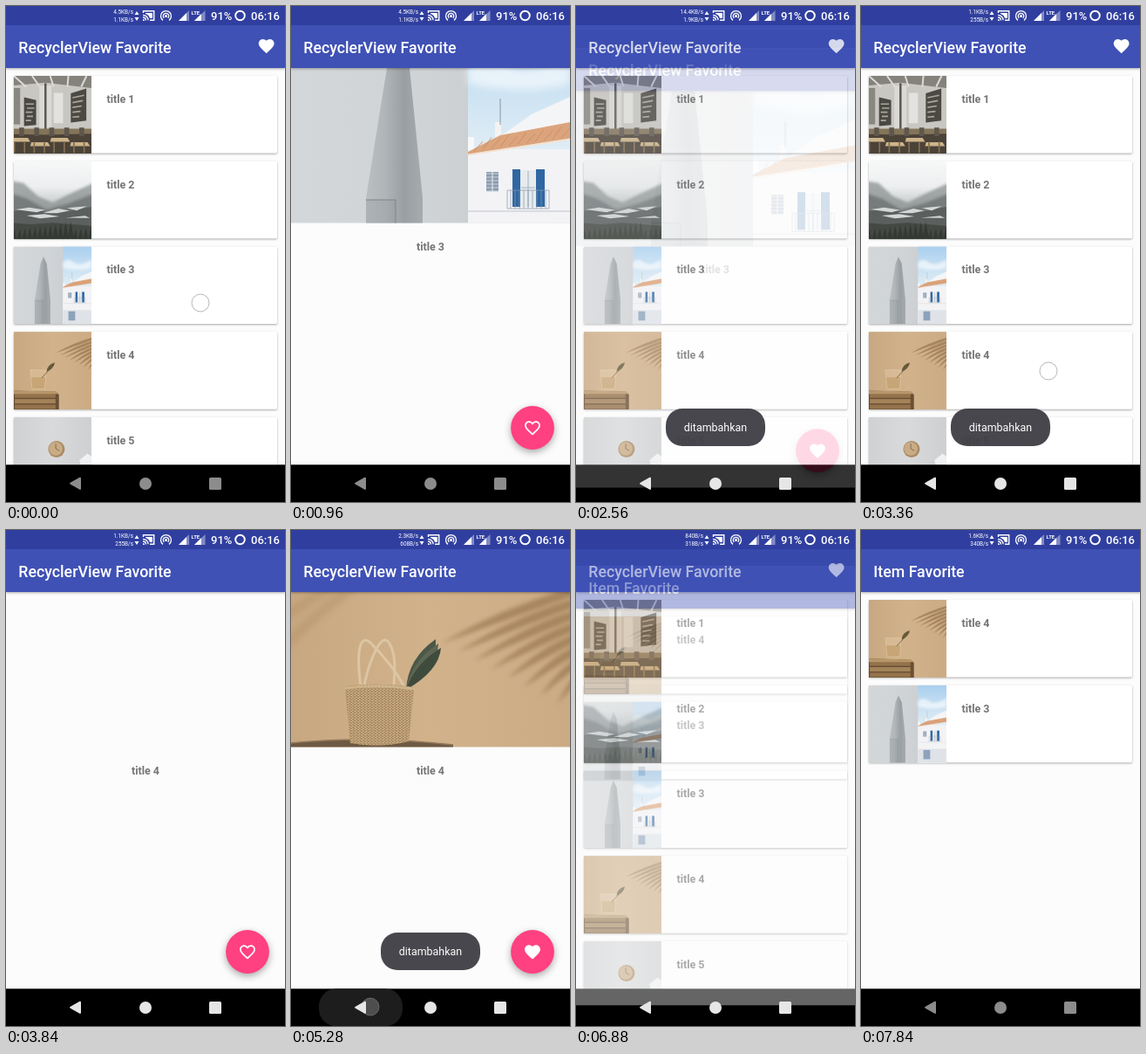
These frames come from a looping animation (320 px wide and 568 px high, 8000 ms). An HTML page:

```html
<!DOCTYPE html>
<html lang="en">
<head>
<meta charset="utf-8">
<title>Favorite list</title>
<style>
  html, body { margin: 0; width: 100%; height: 100%; overflow: hidden; background: #000; }
  svg { display: block; width: 100%; height: 100%; font-family: Roboto, sans-serif; }
  .bar { fill: #3f51b5; filter: drop-shadow(0 1.5px 1.5px #0005); }
  .heading { font-size: 17.78px; font-weight: 500; fill: #fff; }
  .title { font-size: 12.44px; font-weight: 700; fill: #757575; }
  .card { fill: #fff; filter: drop-shadow(0 1px 1px #0005); }
  .fab { fill: #ff4081; filter: drop-shadow(0 3px 4px #0005); }
  .speed { font-size: 6.4px; text-anchor: end; }
  .network { font-size: 6px; font-weight: 700; }
  .status { font-size: 13px; font-weight: 500; }
  .toast { font-size: 12.44px; fill: #fff; text-anchor: middle; }
  .soft { filter: blur(5px); }
  .shade { filter: blur(2.5px); }
</style>
</head>
<body>
<svg id="stage" viewBox="0 0 320 568" preserveAspectRatio="none"></svg>
<script>
const LOOP = 8000, STEP = 160;
const stage = document.getElementById('stage');
const HEART = 'M12 21.35l-1.45-1.32C5.4 15.36 2 12.28 2 8.5 2 5.42 4.42 3 7.5 3c1.74 0 3.41.81 4.5 2.09C13.09 3.81 14.76 3 16.5 3 19.58 3 22 5.42 22 8.5c0 3.78-3.4 6.86-8.55 11.54z';
const HEART_HOLE = 'M12.1 18.55l-.1.1-.1-.1C7.14 14.24 4 11.39 4 8.5 4 6.5 5.5 5 7.5 5c1.54 0 3.04.99 3.57 2.36h1.87C13.46 5.99 14.96 5 16.5 5c2 0 3.5 1.5 3.5 3.5 0 2.89-3.14 5.74-7.9 10.05z';

const rect = (x, y, w, h, fill, extra = '') =>
  `<rect x="${x}" y="${y}" width="${w}" height="${h}" fill="${fill}" ${extra}/>`;
const circle = (x, y, r, fill) => `<circle cx="${x}" cy="${y}" r="${r}" fill="${fill}"/>`;
const path = (d, fill, extra = '') => `<path d="${d}" fill="${fill}" ${extra}/>`;
const stroke = (d, color, width, extra = '') =>
  path(d, 'none', `stroke="${color}" stroke-width="${width}" ${extra}`);
const text = (x, y, cls, value, extra = '') => `<text x="${x}" y="${y}" class="${cls}" ${extra}>${value}</text>`;
const repeat = (n, draw) => Array.from({ length: n }, (_, i) => draw(i)).join('');
const gradient = (id, colors, vertical) =>
  `<linearGradient id="${id}" ${vertical ? 'x2="0" y2="1"' : ''}>` +
  colors.map((c, i) => `<stop offset="${i / (colors.length - 1)}" stop-color="${c}"/>`).join('') +
  '</linearGradient>';

// Palm shadow: leaflets fanning out to the lower left.
const palm = y => repeat(8, i => path(
  `M345 ${y - 22 + i * 13}Q${255 + i * 10} ${y + i * 11} ${172 + i * 19} ${y + 48 + i * 10}Q${265 + i * 9} ${y + 14 + i * 11} 345 ${y - 14 + i * 13}z`,
  '#8f6c45', 'class="shade" opacity=".6"'));

// Every photo is drawn on a 320 x 320 square.
const photos = {
  cafe:
    rect(0, 0, 320, 320, '#c9c7c2') + path('M0 0H320V50L130 28 0 40z', '#85827c') +
    repeat(5, i => stroke(`M${i * 75} 0l${50 - i * 18} 45`, '#dddcd8', 7)) +
    rect(0, 50, 26, 150, '#8a8780') + rect(105, 40, 50, 175, '#dad9d5') +
    rect(126, 30, 9, 200, '#5d5a53') + path('M42 88l50 12v102l-50 5z', '#4a4842') +
    path('M235 72l64-20v132l-64 8z', '#4c4943') +
    repeat(5, i => stroke(`M${49 + i % 2 * 5} ${116 + i * 17}h${34 - i * 3}M242 ${90 + i * 20}l${48 - i * 5} ${-10 + i * 2}`, '#aaa69c', 6)) +
    rect(165, 70, 38, 125, '#e3e2de') + rect(0, 220, 320, 100, '#4b4238') +
    path('M0 218H320V238L130 243 0 240z', '#83745a') +
    repeat(4, i => path(`M${i * 82 - 10} ${255 + i % 2 * 18}h68l10 17h-82z`, '#cdb48a') +
      stroke(`M${i * 82 + 2} 272v45m42-45v45`, '#85704f', 6)) +
    repeat(5, i => rect(22 + i * 62, 213, 20, 35, '#5f574c')),
  mountain:
    rect(0, 0, 320, 320, 'url(#fog)') +
    path('M-20 80l60 10 60 55 60 25 70-35 110-50V320H-20z', '#8b9091', 'class="soft" opacity=".75"') +
    path('M-20 130l75 25 80 45 90-25 115-45V320H-20z', '#6d7273', 'class="soft" opacity=".8"') +
    path('M0 205l80-10 70 20 90-12 80-15V320H0z', '#5b605f', 'class="shade"') +
    path('M8 199l55-8 65 10-34 10zM120 213l64-18 45 9-50 10zM220 193l82-8-43 18zM52 224l74-6 62 10-80 8zM214 233l80-8 20 9z', '#d5d7d7', 'class="shade"') +
    path('M0 255l70 5 90-6 160 12v54H0z', '#454944', 'class="shade"') +
    repeat(16, i => path(`M${i * 21 - 9} 320l13-${38 + i * 37 % 34} 13 70z`, '#30362f', 'opacity=".8"')),
  tower:
    rect(0, 0, 320, 320, 'url(#wall)') +
    path('M122 42L136 71 151 220V320H86V220L110 71z', 'url(#cone)') +
    path('M86 222H120V320H86z', '#8f9597', 'opacity=".3"') +
    stroke('M86 222h34v98', '#7e8389', 1) +
    rect(203, 0, 117, 320, 'url(#sky)') +
    path('M203 65q22-20 44 0t73-12v36q-50 14-117 0z', '#fff', 'class="soft" opacity=".6"') +
    path('M236 152l40-28 44-20v50z', '#f4f5f6') + rect(203, 150, 7, 18, '#f8f8f8') +
    rect(234, 133, 7, 22, '#f3f3f3') + stroke('M240 106v30', '#8d9499', 1) +
    path('M203 164H320V320H203z', '#f3f3f6') +
    path('M203 167l37-19 80-15v19l-117 18z', '#dba47c') +
    repeat(12, i => stroke(`M${210 + i * 10} ${166 - i * 1.5}l10-${11 + i % 2 * 3}`, '#c98f66', .9)) +
    stroke('M203 170.500L320 152.500', '#f4e3d3', 2) +
    rect(224, 190, 14, 22, '#8b9cae') +
    repeat(6, i => stroke(`M224 ${192 + i * 4}h14`, '#c7d1da', 1)) + stroke('M231 190v22', '#eee', 1) +
    rect(254, 187, 9, 43, '#2f67a3') + rect(281, 187, 10, 43, '#2f67a3') + rect(263, 188, 18, 42, '#e6ebee') +
    stroke('M272 189v41m-8-22h16', '#a5b3bf', 1) +
    stroke('M248 211h48v21h-48z' + repeat(9, i => `M${252 + i * 5} 211v21`), '#8896a8', .7) +
    stroke('M203 235h117', '#d0d3d8', 1.5) +
    rect(203, 262, 117, 58, '#dfe3e8') + rect(225, 267, 28, 38, '#8da3bb'),
  glass:
    rect(0, 0, 320, 320, 'url(#sand)') + palm(40) +
    path('M0 242l174 5 12 12v61H0z', '#6a4e34') +
    repeat(3, i => rect(4, 254 + i * 23, 168, 18, i % 2 ? '#a38259' : '#94734c')) +
    path('M0 242l174 4 12 10H0z', '#b8966a') +
    path('M68 157h66l-6 78H75z', '#e6ceaa', 'opacity=".4"') +
    path('M71 188h60l-4 46H75z', '#b88f58', 'opacity=".5"') +
    stroke('M68 157h66l-6 78H75z', '#e2cba8', 2) + stroke('M115 190L166 135', '#665634', 3) +
    path('M135 164q3-30 34-38-5 27-34 38z', '#655a3a'),
  basket:
    rect(0, 0, 320, 320, 'url(#sand)') + palm(82) +
    stroke('M-10 135Q30 95 75 62M-10 100L50 62', '#a7845a', 8, 'class="soft" opacity=".45"') +
    path('M0 244q90-9 186 2v74H0z', '#6d5a44') + stroke('M0 244q90-9 186 2', '#92775a', 1.5) +
    repeat(3, i => path(`M132 183q${2 + i * 4}-${36 - i * 3} ${34 + i * 3}-${58 - i * 5}q${2 - i * 2} 26-${34 + i * 3} ${58 - i * 5}z`, ['#4b5747', '#5d6653', '#3f4b3d'][i])) +
    repeat(2, i => stroke(['M80 180C74 135 80 118 92 130S124 165 130 181', 'M84 177C90 150 104 114 113 130S118 165 118 180'][i], '#dcc6a4', 3) ) +
    path('M62 179q40-5 79 1l-6 62q-32 8-67 2z', '#b49269') +
    path('M62 179q40-5 79 1l-6 62q-32 8-67 2z', 'url(#weave)') +
    stroke('M62 181q40-5 79 1', '#cdb38a', 3),
  clock:
    rect(0, 0, 320, 320, 'url(#plain)') +
    circle(176, 132, 34, '#ab8a64') + circle(173, 130, 28, '#c8ac86') +
    stroke('M173 130v-20m0 20l15 9', '#76604a', 3) +
    path('M270 178l34-28 16 12v34h-44z', '#f0f1f2') + stroke('M300 190l-18 90', '#e6e7e8', 6)
};
const photoOf = [, 'cafe', 'mountain', 'tower', 'glass', 'clock'];

const defs = `<defs>${gradient('fog', ['#f7f8f8', '#eceeef', '#b5babb', '#7b8080'], true)}
  ${gradient('wall', ['#d4d7da', '#d0d3d6', '#c3c6c9'])}
  ${gradient('cone', ['#bbbfc2', '#b0b5b8', '#999fa2', '#a6abae'])}
  ${gradient('sky', ['#a9cfef', '#cfe4f3', '#eef4f7', '#eef4f7'], true)}
  ${gradient('sand', ['#c8a881', '#d1b28b', '#cbab84'])}
  ${gradient('plain', ['#cfd1d3', '#d9dadb', '#cdcfd1'])}
  <pattern id="weave" width="4" height="3" patternUnits="userSpaceOnUse">
    <path d="M0 .7h2.4M2 2.200h2" stroke="#cfb58d"/><path d="M3.300 0v1.5M.8 1.5v1.5" stroke="#94754f" stroke-width=".8"/>
  </pattern>
  <clipPath id="square"><path d="M0 0h320v320H0z"/></clipPath>
  <clipPath id="hero"><path d="M0 71h320v177.400H0z"/></clipPath>
  ${Object.entries(photos).map(([id, art]) => `<g id="${id}" clip-path="url(#square)">${art}</g>`).join('')}
</defs>`;

const heart = (cx, cy, id) =>
  `<path id="${id}" transform="translate(${cx - 10.7} ${cy - 10.9}) scale(.889)" d="${HEART}" fill="#fff" fill-rule="evenodd"/>`;

const card = (n, i) => {
  const y = 80 + i * 97.7;
  return `<rect x="9" y="${y}" width="302" height="88.6" rx="1.5" class="card"/>
    <use href="#${photoOf[n]}" transform="translate(9 ${y}) scale(.278)"/>` +
    text(115.5, y + 31, 'title', 'title ' + n);
};

const page = (id, heading, content, action = '') => `<g id="${id}">
  ${rect(0, 0, 320, 568, '#fcfcfc')}${content}
  <rect y="22" width="320" height="49" class="bar"/>${rect(0, 0, 320, 22, '#303f9f')}
  ${text(14.3, 53.6, 'heading', heading)}${action}
  ${rect(0, 525.3, 320, 43, '#000')}</g>`;

const detail = (id, n, photo) => page(id, 'RecyclerView Favorite', `
  <g id="${id}Photo" clip-path="url(#hero)"><use href="#${photo}"/></g>
  ${text(160, 280, 'title', 'title ' + n, 'text-anchor="middle"')}
  <circle cx="277" cy="483" r="24.9" class="fab"/>
  ${heart(277, 483.5, id + 'Heart')}`);

const statusBar = `<g fill="#fff">
  <text id="down" x="146" y="9" class="speed"/><text id="up" x="146" y="17.5" class="speed"/>
  <path d="M147.500 10l2.500-4 2.500 4zM147.500 13h5l-2.500 4z"/>
  ${stroke('M157.500 8V5.800h12.200v10.400H165', '#fff', 1.4)}
  ${stroke('M157 10.300a6 6 0 0 1 6 6M157 13a3.400 3.400 0 0 1 3.400 3.400', '#fff', 1.3)}
  <path d="M160 8h8v6h-3q-1-4-5-5zM157 15v2h2q0-2-2-2z"/>
  ${stroke('M180 16.400a6 6 0 1 1 7 0M181.300 13.800a3.200 3.200 0 1 1 4.400 0', '#fff', 1.3)}
  ${circle(183.5, 11.5, 1.5, '#fff')}
  <path d="M198 17L210 5V17zM216 17L228.500 5V17z" opacity=".4"/>
  <path d="M198 17l9-9v9zM216 17l8-8v8z"/>
  ${text(212.5, 9.5, 'network', 'LTE')}
  ${text(235, 16, 'status', '91%')}${text(281, 16, 'status', '06:16')}
  <circle cx="268.5" cy="11" r="5.3" fill="none" stroke="#fff" stroke-width="1.9"/></g>`;

stage.innerHTML = defs +
  page('list', 'RecyclerView Favorite', [1, 2, 3, 4, 5].map(card).join(''), heart(298.7, 46.2, 'openFavorites')) +
  detail('towerPage', 3, 'tower') + detail('basketPage', 4, 'basket') +
  page('favorites', 'Item Favorite', [4, 3].map(card).join('')) + statusBar +
  `<g id="toast">${rect(103, 461, 114, 43, '#404046', 'rx="19" opacity=".96"')}
    ${text(160, 487, 'toast', 'ditambahkan')}</g>
  ${rect(32, 525.3, 96, 43, '#1d1d1d', 'id="ripple" rx="20"')}
  <circle id="touch" r="10" fill="#fff" fill-opacity=".22" stroke="#888" stroke-opacity=".6"/>
  <g id="nav"><path d="M73.500 546l11-6.200q1.500-.5 1.500 1v12q0 1.500-1.500 1l-11-6.200q-1-.8 0-1.600z"/>
    <circle cx="160" cy="547" r="7"/><rect x="233" y="540" width="14" height="14" rx="1.5"/></g>`;

const el = id => document.getElementById(id);
const ramp = (t, start, length) => Math.max(0, Math.min(1, (t - start) / length));
const during = (t, start, end) => t >= start && t < end;
const show = (id, opacity) => el(id).setAttribute('opacity', +opacity);

// Pages rise while fading in and sink while fading out.
function movePage(id, t, open, close = Infinity) {
  const enter = ramp(t, open, 320);
  const y = 45 * ((1 - enter) ** 3 + ramp(t, close, 240));
  show(id, Math.min(1, 1.6 * enter) * (1 - ramp(t, close, 175)));
  el(id).setAttribute('transform', `translate(0 ${y})`);
}

const details = [
  { id: 'towerPage', open: 400, loaded: 800, liked: 1440, close: 2420 },
  { id: 'basketPage', open: 3440, loaded: 4000, liked: 4640, close: 5300 }
];
const touches = [
  [223, 340, 0, 160], [277, 483, 1280, 1440], [91, 546, 2080, 2240], [215, 418, 3200, 3360],
  [277, 483, 4480, 4640], [91, 546, 5120, 5300], [312, 43, 6240, 6720]
];
const speeds = [
  [0, '4.5KB/s', '1.1KB/s'], [1920, '14.4KB/s', '1.9KB/s'], [3360, '1.1KB/s', '255B/s'],
  [4800, '2.3KB/s', '608B/s'], [6080, '840B/s', '318B/s'], [7520, '1.6KB/s', '340B/s']
];

function render(t) {
  for (const { id, open, loaded, liked, close } of details) {
    movePage(id, t, open, close);
    show(id + 'Photo', t >= loaded);
    el(id + 'Heart').setAttribute('d', t >= liked ? HEART : HEART + HEART_HOLE);
  }
  movePage('favorites', t, 6800);

  show('toast', Math.max(...details.map(d =>
    ramp(t, d.liked + 80, 200) * (1 - ramp(t, d.liked + 2040, 200)))));
  show('ripple', during(t, 2080, 2400) || during(t, 5120, 5440));
  const bright = ramp(t, 1920, 160) * (1 - ramp(t, 6880, 640));
  const grey = Math.round(140 + 90 * bright);
  el('nav').setAttribute('fill', `rgb(${grey},${grey},${grey})`);

  const touch = touches.find(([, , from, to]) => during(t, from, to + 160));
  show('touch', touch ? 1 - .8 * ramp(t, touch[3], 160) : 0);
  if (touch) {
    el('touch').setAttribute('cx', touch[0]);
    el('touch').setAttribute('cy', touch[1]);
  }

  const [, down, up] = speeds.filter(([start]) => t >= start).pop();
  el('down').textContent = down;
  el('up').textContent = up;
}

const begin = performance.now();
function tick() {
  const t = (performance.now() - begin) % LOOP;
  render(Math.floor(t / STEP) * STEP);
  requestAnimationFrame(tick);
}
tick();
</script>
</body>
</html>
```
